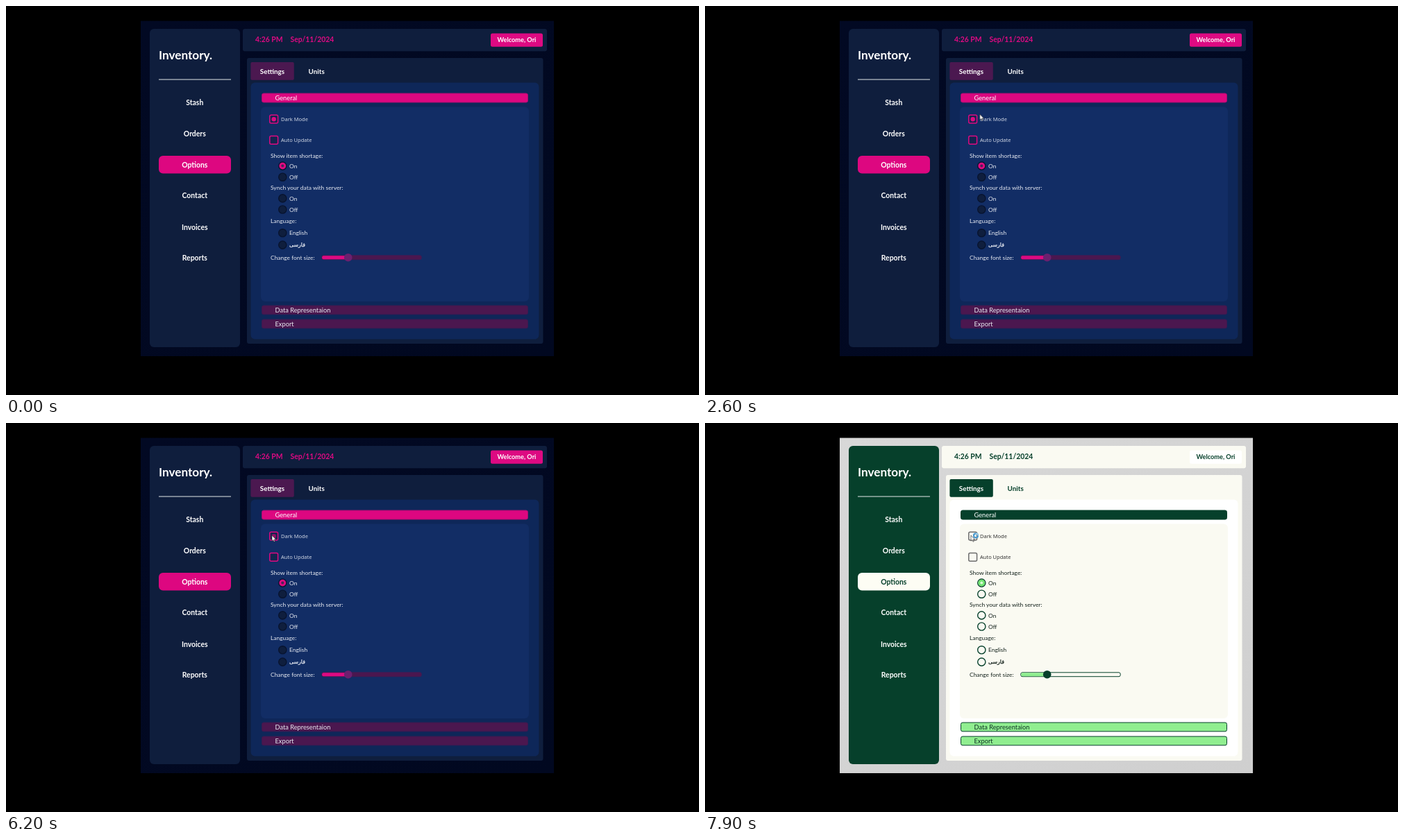
Write an HTML page that moves like this. It is 998x561 px and loops after 8000 ms.

```html
<!DOCTYPE html>
<html lang="en">
<head>
<meta charset="utf-8">
<title>Inventory options</title>
<style>
html, body { margin: 0; width: 100%; height: 100%; overflow: hidden; background: #000; }
svg { display: block; width: 998px; height: 561px; animation: theme 8s step-end infinite; }
text { font: 8.45px Lato, sans-serif; fill: var(--text); }

@keyframes theme {
  0% {
    --win1: #020923; --win2: #010820; --side: #0f1e3d; --panel: #0f1e3d; --page: #0e2759; --box: #122d65;
    --head: #dd0a82; --btn: #dd0a82; --btn-text: #fff; --tab: #4b1850; --tab-text: #fff;
    --active: #dd0780; --active-text: #fff; --text: #e9ecf3; --bar: #dd0780; --bar-line: #a50e70;
    --fold: #4b174f; --fold-line: #3a1a50; --fold-text: #e9ecf3;
    --check: #dd0a82; --check-bg: #14244f; --dot: #dd0a82; --label: #cfd6e4;
    --radio: #0f1e3d; --ring: #081430; --on: #dd0a82; --on-dot: #4a2358;
    --groove: #4b174f; --groove-line: #421a52; --fill: #dd0a82; --knob: #6b206f;
  }
  35% { --dot: #8f1168; }
  83.75%, 100% {
    --win1: #d8d8d8; --win2: #cfcfcf; --side: #06402b; --panel: #fafaf2; --page: #fff; --box: #fafaf2;
    --head: #06402b; --btn: #fff; --btn-text: #06402b; --tab: #06402b; --tab-text: #fff;
    --active: #fdfdf4; --active-text: #06402b; --text: #12201a; --bar: #06402b; --bar-line: #06402b;
    --fold: #90ee90; --fold-line: #06402b; --fold-text: #0b3023;
    --check: #6d6d6d; --check-bg: #f8f8f1; --dot: transparent; --label: #333;
    --radio: #fafaf2; --ring: #06402b; --on: #6fe46f; --on-dot: #d9f9d5;
    --groove: #fafaf2; --groove-line: #06402b; --fill: #90ee90; --knob: #06402b;
  }
}

.side { fill: var(--side); }
.panel { fill: var(--panel); }
.page { fill: var(--page); }
.box { fill: var(--box); }
.active { fill: var(--active); }
.btn { fill: var(--btn); }
.tab { fill: var(--tab); }
.bar { fill: var(--bar); stroke: var(--bar-line); }
.fold { fill: var(--fold); stroke: var(--fold-line); }
.check { fill: var(--check-bg); stroke: var(--check); stroke-width: 1.5; }
.dot { fill: var(--dot); }
.radio { fill: var(--radio); stroke: var(--ring); stroke-width: 1.4; }
.on { fill: var(--on); }
.on-dot { fill: var(--on-dot); }
.groove { fill: var(--groove); stroke: var(--groove-line); }
.fill { fill: var(--fill); }
.knob { fill: var(--knob); }

.menu text { font-size: 10.4px; font-weight: 700; text-anchor: middle; fill: #fff; }
.menu .current { fill: var(--active-text); }
.brand { font-size: 17.2px; font-weight: 700; fill: #fff; }
.head { font-size: 10.4px; font-weight: 700; fill: var(--head); }
.welcome { font-size: 9.2px; font-weight: 700; text-anchor: middle; fill: var(--btn-text); }
.tabs { font-size: 9.9px; font-weight: 700; text-anchor: middle; fill: var(--head); }
.tabs.sel { fill: var(--tab-text); }
.units { fill: var(--units, var(--btn-text)); }
.title { font-size: 9.25px; fill: #fff; }
.fold-title { font-size: 9.25px; fill: var(--fold-text); }
.label { font: 7.5px "Noto Sans", sans-serif; fill: var(--label); }
.farsi { font: 7.8px "DejaVu Sans", sans-serif; stroke: var(--text); stroke-width: .25; }

.cursor { animation: move 8s infinite; }
@keyframes move {
  0% { transform: translate(575px, 496px); opacity: 0; animation-timing-function: step-end; }
  20% { transform: translate(575px, 496px); opacity: 1; animation-timing-function: steps(2); }
  22.5% { transform: translate(505px, 290px); opacity: 1; animation-timing-function: steps(3); }
  26.25% { transform: translate(462px, 173px); opacity: 1; animation-timing-function: steps(3); }
  30% { transform: translate(400px, 154px); opacity: 1; animation-timing-function: steps(8); }
  40%, 100% { transform: translate(383px, 162px); opacity: 1; }
}
.busy { animation: busy 8s step-end infinite; }
@keyframes busy {
  0% { opacity: 0; }
  98.75%, 100% { opacity: 1; }
}
</style>
</head>
<body>
<svg viewBox="0 0 998 561">
  <defs>
    <linearGradient id="win" x2="1" y2="1">
      <stop style="stop-color: var(--win1)"/>
      <stop offset="1" style="stop-color: var(--win2)"/>
    </linearGradient>
    <circle id="radio" class="radio" cx="398.3" r="5.6"/>
  </defs>

  <rect width="998" height="561"/>
  <rect x="194" y="21.5" width="595" height="483.5" fill="url(#win)"/>

  <rect class="side" x="207" y="33" width="130" height="459" rx="6"/>
  <text class="brand" x="220" y="77">Inventory.</text>
  <path d="M220 106H324" stroke="#e4e7ea" stroke-width="1.2"/>
  <rect class="active" x="220" y="216" width="104" height="25.6" rx="6"/>
  <g class="menu">
    <text x="271.8" y="143.3">Stash</text>
    <text x="271.8" y="187.9">Orders</text>
    <text x="271.8" y="232.6" class="current">Options</text>
    <text x="271.8" y="277.2">Contact</text>
    <text x="271.8" y="322.5">Invoices</text>
    <text x="271.8" y="367.2">Reports</text>
  </g>

  <rect class="panel" x="341" y="33" width="438" height="32.3" rx="3"/>
  <text class="head" x="359" y="52.4">4:26 PM</text>
  <text class="head" x="409.5" y="52.4">Sep/11/2024</text>
  <rect class="btn" x="698" y="39.5" width="75" height="19.2" rx="2.5"/>
  <text class="welcome" x="735.4" y="52.2">Welcome, Ori</text>

  <rect class="panel" x="347" y="75" width="426.5" height="412" rx="3"/>
  <rect class="tab" x="352.4" y="81" width="62.4" height="25.8" rx="2"/>
  <text class="tabs sel" x="383.4" y="97.6">Settings</text>
  <text class="tabs units" x="447.2" y="97.6">Units</text>
  <rect class="page" x="352.5" y="110.5" width="415" height="370" rx="6"/>

  <rect class="bar" x="368.5" y="126" width="383" height="13" rx="2.5"/>
  <text class="title" x="387.5" y="135.8">General</text>
  <rect class="box" x="367" y="145.5" width="386" height="280.5" rx="6"/>

  <rect class="check" x="379.8" y="157.3" width="11.8" height="11.8" rx="2"/>
  <circle class="dot" cx="385.7" cy="163.2" r="3.2"/>
  <text class="label" x="396" y="166">Dark Mode</text>
  <rect class="check" x="379.8" y="187.5" width="11.8" height="11.8" rx="2"/>
  <text class="label" x="396" y="196.2">Auto Update</text>

  <text x="381" y="218.6">Show item shortage:</text>
  <use href="#radio" y="230.6"/>
  <circle class="on" cx="398.3" cy="230.6" r="4.9"/>
  <circle class="on-dot" cx="398.3" cy="230.6" r="2"/>
  <text x="408" y="233.8">On</text>
  <use href="#radio" y="246.7"/>
  <text x="408" y="249.8">Off</text>

  <text x="381" y="265.4">Synch your data with server:</text>
  <use href="#radio" y="277.4"/>
  <text x="408" y="280.5">On</text>
  <use href="#radio" y="293.5"/>
  <text x="408" y="296.6">Off</text>

  <text x="381" y="313.2">Language:</text>
  <use href="#radio" y="327.3"/>
  <text x="408" y="330.4">English</text>
  <use href="#radio" y="344.6"/>
  <text class="farsi" x="408" y="347">فارسی</text>

  <text x="381" y="365.6">Change font size:</text>
  <rect class="groove" x="454.8" y="359.8" width="143.4" height="5.9" rx="2.2"/>
  <rect class="fill" x="455.2" y="360.2" width="37" height="5.1" rx="2"/>
  <circle class="knob" cx="492.7" cy="362.7" r="5.8"/>

  <rect class="fold" x="368.5" y="432" width="383" height="12.8" rx="2.5"/>
  <text class="fold-title" x="387.5" y="441.5">Data Representaion</text>
  <rect class="fold" x="368.5" y="452" width="383" height="12.8" rx="2.5"/>
  <text class="fold-title" x="387.5" y="461.8">Export</text>

  <g class="cursor">
    <path d="M0 0V8.2L1.8 6.6L3 9.3L4.3 8.7L3.1 6.1H5.6Z" fill="#fff" stroke="#222" stroke-width=".6"/>
  </g>
  <g class="busy" fill="none">
    <circle cx="390" cy="162.4" r="3" stroke="#4a9ad0" stroke-width="2.2"/>
    <path d="M390 159.4a3 3 0 0 1 3 3" stroke="#a5d3ee" stroke-width="1.6"/>
  </g>
</svg>
</body>
</html>
```
